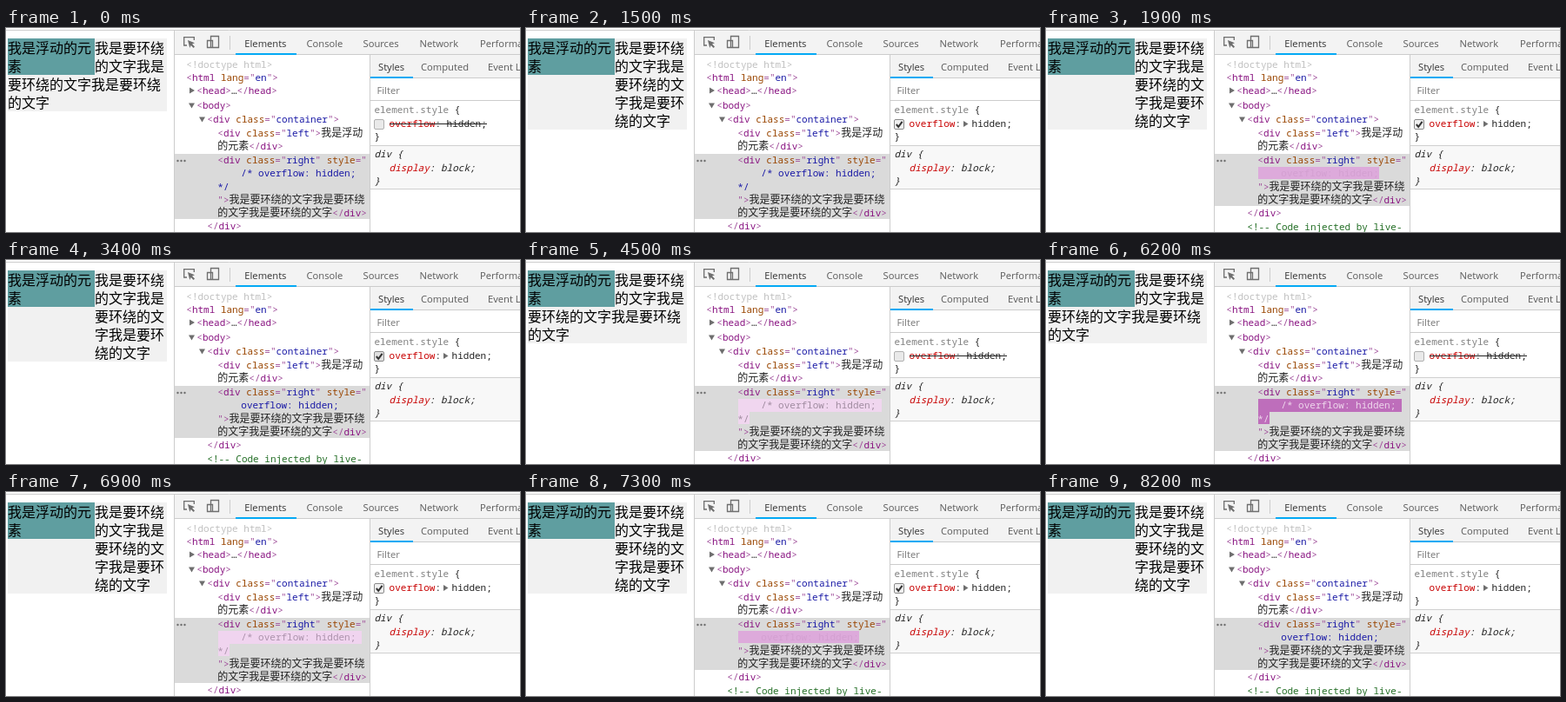
Animation of 591x235 px, one loop 8.3 s. Source, as an HTML page:

```html
<!DOCTYPE html>
<html lang="zh-CN">
<head>
<meta charset="utf-8">
<title>overflow: hidden</title>
<style>
html, body { margin: 0; width: 100%; height: 100%; overflow: hidden; background: #fff; }
svg { display: block; width: 591px; height: 235px; }
text { white-space: pre; }
.page { font: 16px "Noto Sans CJK SC", sans-serif; }
.ui { font: 11.2px "Open Sans", sans-serif; fill: #5a5a5a; }
.ui .on { fill: #333; }
.code { font: 11px "Noto Sans Mono", "DejaVu Sans Mono", monospace; fill: #a04f9b; }
.tag { fill: #881280; }
.name { fill: #994500; }
.val { fill: #1a1aa6; }
.prop { fill: #c80000; }
.dark { fill: #222; }
.gray { fill: #808080; }
.type { fill: #c0c0c0; }
.note { fill: #236e25; }
.cjk { font: 12px "Noto Sans CJK SC", sans-serif; fill: #222; }
.agent { font-style: italic; }
</style>
</head>
<body>
<svg viewBox="0 0 591 235">
  <!-- page -->
  <g class="page">
    <rect id="box" x="2" y="12" width="183" fill="#f1f1f1"/>
    <rect x="2" y="12" width="100" height="42" fill="#5f9ea0"/>
    <text x="2" y="29">我是浮动的元</text><text x="2" y="50">素</text>
    <text x="102" y="29">我是要环绕</text><text x="102" y="50">的文字我是</text>
    <g id="pageOff"><text x="2" y="71">要环绕的文字我是要环绕</text><text x="2" y="92">的文字</text></g>
    <g id="pageOn"><text x="102" y="71">要环绕的文</text><text x="102" y="92">字我是要环</text><text x="102" y="113">绕的文字</text></g>
  </g>

  <!-- toolbars -->
  <path fill="#f3f3f3" d="M193 3h398v27H193zM419 31h172v26H419z"/>
  <path stroke="#ccc" fill="none" d="M193.5 3V235M0 2.5H591M193 30.5H591M418.5 31V235M419 57.5H591M419 83.5H591M257.5 9V25"/>
  <path fill="#03a9f4" d="M264 29h70v2h-70zM419 56h49v2h-49z"/>
  <g fill="#f3f3f3" stroke="#6e6e6e" stroke-width="1.3">
    <path d="M208 20h-3.3V10.7h11.6V14"/>
    <path d="M235.5 9.5h9v13h-9zM231.5 14.5h6v8h-6z"/>
  </g>
  <path fill="#6e6e6e" d="M209 14l8 3.2-3 1.3 3 3-1.4 1.4-3-3-1.3 3z"/>
  <g class="ui">
    <text class="on" x="274.3" y="22">Elements</text><text x="345.5" y="22">Console</text>
    <text x="410.5" y="22">Sources</text><text x="475.5" y="22">Network</text><text x="545" y="22">Performance</text>
    <text class="on" x="428" y="49">Styles</text><text x="477" y="49">Computed</text><text x="554" y="49">Event Listeners</text>
    <text x="426.5" y="76" fill="#777">Filter</text>
  </g>

  <!-- element tree -->
  <g class="code">
    <rect id="sel" x="194" y="145" width="224" fill="#dadada"/>
    <g fill="#6e6e6e">
      <path d="M211 68.5l6 3.5-6 3.5zM210 86.5h7l-3.5 6zM222 102.5h7l-3.5 6z"/>
      <circle cx="197.5" cy="153" r="1.2"/><circle cx="201.5" cy="153" r="1.2"/><circle cx="205.5" cy="153" r="1.2"/>
    </g>
    <g transform="translate(-.7 0)">
      <text class="type" x="208" y="46">&lt;!doctype html&gt;</text>
      <text x="208" y="61">&lt;<tspan class="tag">html </tspan><tspan class="name">lang</tspan>="<tspan class="val">en</tspan>"&gt;</text>
      <text x="220" y="76">&lt;<tspan class="tag">head</tspan>&gt;<tspan class="dark">…</tspan>&lt;/<tspan class="tag">head</tspan>&gt;</text>
      <text x="220" y="93">&lt;<tspan class="tag">body</tspan>&gt;</text>
      <text x="232" y="109">&lt;<tspan class="tag">div </tspan><tspan class="name">class</tspan>="<tspan class="val">container</tspan>"&gt;</text>
      <text x="244" y="125">&lt;<tspan class="tag">div </tspan><tspan class="name">class</tspan>="<tspan class="val">left</tspan>"&gt;<tspan class="cjk">我是浮动</tspan></text>
      <text x="244" y="140"><tspan class="cjk">的元素</tspan>&lt;/<tspan class="tag">div</tspan>&gt;</text>
      <text x="244" y="156">&lt;<tspan class="tag">div </tspan><tspan class="name">class</tspan>="<tspan class="val">right</tspan>" <tspan class="name">style</tspan>="</text>
    </g>
    <path id="glow"/>
    <g transform="translate(-.7 0)">
      <g id="treeOff"><text class="hot" x="271" y="171">/* overflow: hidden;</text><text class="hot" x="244" y="187">*/</text></g>
      <g id="treeOn"><text class="hot" x="271" y="171">overflow: hidden;</text></g>
      <g id="tail">
        <text x="244" y="187">"&gt;<tspan class="cjk">我是要环绕的文字我是要环绕</tspan></text>
        <text x="244" y="202"><tspan class="cjk">的文字我是要环绕的文字</tspan>&lt;/<tspan class="tag">div</tspan>&gt;</text>
        <text x="232" y="217">&lt;/<tspan class="tag">div</tspan>&gt;</text>
        <text class="note" x="232" y="233">&lt;!-- Code injected by live-</text>
      </g>
    </g>
  </g>

  <!-- style rules -->
  <g class="code">
    <rect x="419" y="136" width="172" height="49" fill="#f8f8f8"/>
    <path stroke="#d0d0d0" d="M419 135.5H591M419 185.5H591"/>
    <text class="gray" x="423.4" y="98">element.style <tspan class="dark">{</tspan></text>
    <text class="dark" x="423.4" y="129">}</text>
    <g id="ruleOff">
      <text class="dark" x="440.6" y="114"><tspan class="prop">overflow</tspan>: hidden;</text>
      <path stroke="#222" d="M441 110.5H553"/>
    </g>
    <g id="ruleOn">
      <text class="dark" x="440.6" y="114"><tspan class="prop">overflow</tspan>:</text>
      <path fill="#6e6e6e" d="M503 107l5.5 3.5-5.5 3.5z"/>
      <text class="dark" x="512.6" y="114">hidden;</text>
    </g>
    <g id="check">
      <rect id="frame" x="423.5" y="105.5" width="11" height="11" rx="1.5"/>
      <path id="tick" fill="none" stroke="#333" stroke-width="2" d="M425.8 111l2.4 2.8 4.4-6"/>
    </g>
    <g class="agent">
      <text class="dark" x="423.4" y="149">div {</text>
      <text class="dark" x="440.6" y="165"><tspan class="prop">display</tspan>: block;</text>
      <text class="dark" x="423.4" y="180">}</text>
    </g>
  </g>
</svg>
<script>
const $ = id => document.getElementById(id);
const LOOP = 8300, TREE_DELAY = 100;
const clicks = [1500, 3600, 5000, 6100, 6900];           // each one flips the rule
const presses = [[900, 1500], [3400, 3600], [5900, 6100]];
const ticks = [0, 100, 200, 300, 500, 800, 1000, 1100, 1200];
// update glow: ms, background, text
const glowKeys = [
  [0, [190, 110, 187], [238, 215, 236]],
  [300, [221, 170, 219], [211, 160, 209]],
  [500, [240, 212, 239], [172, 147, 172]],
  [600, [240, 214, 239], [160, 140, 160]],
  [800, [218, 218, 218], [110, 110, 165]],
  [1000, [218, 218, 218], [26, 26, 166]]
];
const hot = document.querySelectorAll(".hot");

const show = (id, on) => $(id).setAttribute("display", on ? "inline" : "none");
const set = (id, name, value) => $(id).setAttribute(name, value);
const swap = (id, on) => { show(id + "On", on); show(id + "Off", !on); };
const flips = t => clicks.filter(c => c <= t).length;

function glowAt(age) {
  const i = glowKeys.findIndex(k => k[0] > age);
  const b = glowKeys[i < 0 ? glowKeys.length - 1 : i];
  const a = i < 0 ? b : glowKeys[i - 1];
  const p = a === b ? 1 : (age - a[0]) / (b[0] - a[0]);
  return [1, 2].map(c => `rgb(${a[c].map((v, j) => Math.round(v + (b[c][j] - v) * p))})`);
}

function draw(t) {
  const on = flips(t) % 2 === 1;
  swap("page", on);
  swap("rule", on);
  set("box", "height", on ? 105 : 84);

  const n = flips(t - TREE_DELAY), treeOn = n % 2 === 1;
  swap("tree", treeOn);
  set("sel", "height", treeOn ? 60 : 75);
  set("tail", "transform", `translate(0 ${treeOn ? 0 : 15})`);

  const since = n ? t - TREE_DELAY - clicks[n - 1] : LOOP;
  let age = ticks.filter(k => k <= since).pop();
  if (!treeOn && age > 500) age -= 200;                  // the comment fades later
  const [back, ink] = glowAt(age);
  set("glow", "d", treeOn ? "M244 160h139v14H244z" : "M244 160h165v15H257v14H244z");
  set("glow", "fill", back);
  hot.forEach(el => el.style.fill = ink);

  const pressed = presses.some(([a, b]) => t >= a && t < b);
  show("check", t < 8000);
  show("tick", on);
  set("frame", "fill", pressed ? "#e0e0e0" : on ? "#f0f0f0" : "#e9e9e9");
  set("frame", "stroke", on || pressed ? "#8a8a8a" : "#b0b0b0");
}

const start = performance.now();
function loop() {
  draw((performance.now() - start) % LOOP);
  requestAnimationFrame(loop);
}
loop();
</script>
</body>
</html>
```
